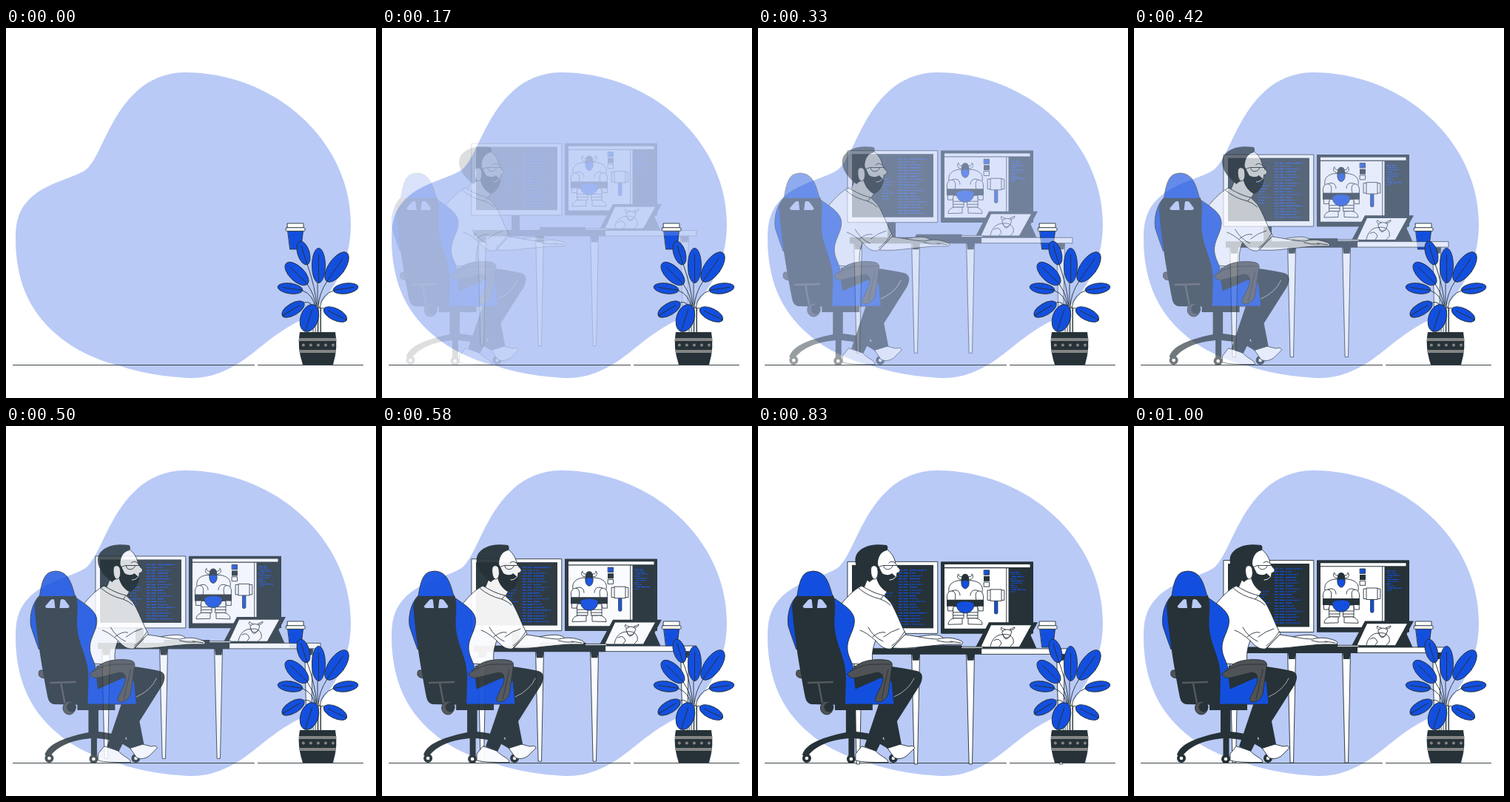
An HTML page for the animation above (1.04 s loop, 500 px wide and 500 px high).

```html
<!DOCTYPE html>
<html lang="en">
<head>
<meta charset="utf-8">
<title>Game artist at work</title>
<style>
html, body { margin: 0; width: 100%; height: 100%; overflow: hidden; background: #fff; }
svg { display: block; width: 100vw; height: 100vh; }
svg * { stroke-linejoin: round; stroke-linecap: round; }
.d { fill: #263238; }
.b { fill: #134fdf; stroke: #263238; stroke-width: .9; }
.w { fill: #fff; stroke: #263238; stroke-width: .9; }
.g { fill: #505355; stroke: #263238; stroke-width: .9; }
.l { fill: none; stroke: #263238; stroke-width: .9; }
.grey { fill: #858585; }
.greyLine { fill: none; stroke: #55595b; stroke-width: 2.4; }
.code { fill: none; stroke: #134fdf; stroke-width: 1.2; }
.code path { stroke-linecap: butt; }
</style>
</head>
<body>
<svg viewBox="0 0 500 500">
  <path fill="#b9caf6" d="M104 194C117 188 126 163 140 136C160 98 188 61 241 60C366 60 466 155 466 265C466 320 440 366 398 395C355 416 333 445 302 460C278 472 262 473 246 473C215 471 180 466 152 456C100 443 58 414 35 375C18 346 13 313 13 285C13 262 17 247 30 233C50 211 86 204 104 194Z"/>
  <path class="l" d="M9.500 455.500H335.500M340.500 455.500H482.500"/>

  <g id="cup">
    <path class="b" d="M381 274.500H401.500L398.500 299H384Z"/>
    <rect class="w" x="380.500" y="264" width="21.500" height="6"/>
    <rect class="w" x="378.300" y="269.800" width="25.700" height="4.600" rx="1"/>
  </g>

  <g id="desk">
    <g id="legs"></g>
    <path class="d" d="M175 278H186V299H175Z"/>
    <rect class="w" x="121.300" y="181.500" width="121.500" height="97"/>
    <rect class="d" x="127" y="186" width="110" height="85.500"/>
    <g class="code" id="editor"></g>

    <rect class="d" x="247" y="181.300" width="125" height="97.500" rx=".8"/>
    <path fill="#fff" d="M252 185.200H367.500V189.200H252ZM252 190.300H338.500V272H252Z"/>
    <path class="l" d="M335.700 190V272" stroke-width=".6"/>
    <g class="code" id="panel"></g>
    <rect class="b" x="305.500" y="193" width="7" height="6.300"/>
    <rect class="d" x="305" y="201" width="8" height="7"/>
    <rect class="w" x="305.500" y="209.300" width="7" height="6"/>
    <rect class="b" x="319.600" y="233" width="4.300" height="19" rx="1.500"/>
    <path class="w" d="M310.500 220H314V219H329V220H332.800V233.500H329V234.500H314V233.500H310.500ZM314 220V233.500M329 220V233.500"/>

    <g id="warrior">
      <path class="w" d="M264 242H278V258H264ZM283 242H297V258H283ZM264 250H278M283 250H297M264 254H278M283 254H297"/>
      <path class="w" d="M257 266C257 260 264 257 269 258H276V265.500ZM303 266C303 260 296 257 291 258H284V265.500Z"/>
      <path class="w" d="M258 222C256 212 264 208 271 207H289C298 208 305 213 303 222L300 236H261Z"/>
      <path class="w" d="M256 234C254 226 257 221 262 221C268 222 267 229 266 234L263 248H257ZM304 234C306 226 303 221 298 221C293 222 294 229 295 234L298 248H304Z"/>
      <path class="l" d="M262 221C268 218 273 221 273 227M298 221C292 218 287 221 287 227"/>
      <path class="d" d="M255 233H305V242H255Z"/>
      <path class="b" d="M268 238C274 234 286 234 292 238C292 246 287 251 280 251C273 251 268 246 268 238Z"/>
      <path class="w" d="M275 206C268 205 269 200 271 198C271 202 274 202 277 202ZM285 206C292 205 291 200 289 198C289 202 286 202 283 202Z"/>
      <path class="d" d="M275 208C274 201 277 198 280 198S286 201 285 208Z"/>
      <path class="b" d="M275 208Q280 205 285 208C286 215 282 218 280 218S274 215 275 208Z"/>
    </g>

    <path class="d" d="M312 263.500H378L368.500 281L376.500 299H293Z"/>
    <path fill="#fff" d="M315 267.300H369L353 296.300H301.500Z"/>
    <path class="l" d="M314 296C316 286 322 280 330 280C339 278 347 283 345 292L341 296M319 288Q326 283 329 292L326 296M331 280Q334 292 341 281M330 276Q336 270 343 276L340 283Q334 287 331 281ZM331 275Q327 274 329 270Q331 273 334 273M341 274Q347 274 347 270Q343 272 340 273"/>
    <path class="w" d="M302 299H425V306.500H302Z"/>
    <path class="d" d="M124 298.500H302V307H124ZM214 294.500H275L277 299H212Z"/>
    <rect class="w" x="275" y="296.300" width="29" height="2"/>
  </g>

  <g id="worker">
    <path class="d" d="M117 384H130.500V413C152 415 171 421 182 435L187 445H181C172 430 152 424 128.500 422V452H120.500V422C100 424 80 429 66 445H58C61 432 78 422 117 414Z"/>
    <g id="wheels"></g>

    <path class="w" d="M138 433L130 443V452Q140 455 174 454.500C174 449 164 447 157 439Z"/>
    <path class="w" d="M173 435L182 448Q190 452 199 446L210 435Q209 431 202 433L190 430Z"/>
    <path class="d" d="M165 365L195 365L158 440L142 433Z"/>
    <path class="d" d="M128 324C165 321 195 327 213 331C221 333 222 340 217 350L186 399L192 430L173 436L162 402L174 366H128Z"/>
    <path d="M209 341Q202 357 182 366" fill="none" stroke="#fff" stroke-width=".6"/>

    <path class="w" d="M212 285C225 283 240 280 247 285L250 289L238 290Z"/>
    <path class="w" d="M148 184L170 165C178 170 183 178 184 186L190 194Q190.500 198 186 198.500L185 206L176 218L168 231L141 219L146 207Z"/>
    <path class="d" d="M149 211C138 203 127 190 130 177C134 163 153 158 172 161C175 165 173 168 171 168.500C165 170 160 176 160 187L166 199C171 202 176 202 179 199L186 205C185 215 177 224 172 224C166 221 160 214 158 205C155 207 151 208 149 211Z"/>
    <path class="w" d="M151 191C153 187 160 188 160 195C161 202 159 207 155 207C151 205 150 197 151 191Z"/>
    <path class="l" d="M160 191L167 188.500H187V191M168 189C168 196 179 195 180 189" stroke-width="1.200"/>
    <path class="l" d="M175 185Q179 181 183 185" stroke-width="1.800"/>
    <path d="M176 208Q181 208 184 204" fill="none" stroke="#fff"/>
    <path class="w" d="M138 216C126 222 116 234 107 245L108 320L154 323C151 311 153 300 157 290C165 299 170 302 178 301L198 281C191 269 185 250 177 238L168 229C155 226 147 221 138 216Z"/>
    <path class="l" d="M134 219Q146 230 164 234L168 229M164 234Q172 237 177 242M147 272Q154 285 167 291M157 290Q145 279 136 276M168 285Q178 277 189 274M153 285Q162 277 170 279M179 297Q189 290 196 278"/>
    <path class="w" d="M197 282C213 284 228 288 241 288C252 285 262 286 272 290Q277 293 273 295L262 295C245 295 235 297 222 298C205 300 195 301 180 300Z"/>
    <path class="l" d="M258 291L272 293M240 290Q250 293 261 292"/>

    <path class="g" d="M58 330H52Q49 331 50 337Q52 341 60 341Z"/>
    <path class="b" d="M51 229C42 238 37 254 39 270Q43 283 50 302L60 280Z"/>
    <path class="b" d="M100 232C113 241 125 248 128 259C131 272 120 284 119 297C118 312 127 318 127 331L130 355L164 340L179 345L182 376H112L100 280Z"/>
    <path class="d" fill-rule="evenodd" d="M52 229H100C105 243 100 258 102 275C105 300 118 315 117 343L116 377L70 376Q64 375 62 367C52 315 47 280 44 243Q46 233 52 229ZM59 243L66 235Q71 232 71 237L72 246H62Q58 246 59 243ZM91 243L85 235Q79 232 79 237L78 246H88Q92 246 91 243Z"/>
    <path class="b" d="M51 230C53 216 56 199 67 197Q73 195 79 197C92 201 95 217 99 230Z"/>
    <path class="d" d="M102 376H153V384H102Z"/>
    <path class="greyLine" d="M66 347L99 346M80 348L85 374"/>
    <ellipse class="g" cx="91" cy="381" rx="8.500" ry="9"/>
    <circle class="d" cx="94" cy="380" r="6.500"/>
    <path class="g" d="M119 335C127 328 132 321 143 318C154 315 166 315 175 317Q181 319 179 326L174 362Q170 373 160 373Q155 372 157 367L166 348Q170 333 159 333L131 340Q121 342 119 335Z"/>
    <path class="l" d="M123 332Q139 321 158 322L177 322M174 329L165 369"/>
  </g>

  <g id="plant"></g>
</svg>
<script>
const LOOP = 1040, FRAME = 1000 / 24, SLIDE = 30;
const byId = id => document.getElementById(id);
const repeat = (n, draw) => Array.from({ length: n }, (_, i) => draw(i)).join('');
const noise = i => Math.abs(Math.sin(i * 12.9898) * 43758.5453) % 1;

byId('legs').innerHTML = [130, 208, 282, 404].map(x =>
  `<path class="w" d="M${x} 306H${x + 10.5}L${x + 7.5} 455H${x + 3.5}Z"/>
   <path class="d" d="M${x} 306H${x + 10.5}L${x + 9.5} 315H${x + 1}Z"/>`).join('');

byId('editor').innerHTML = repeat(20, i => {
  const y = 193 + i * 3.85, length = 8 + 16 * noise(i + 1);
  const indent = i > 6 && i < 15 ? `<path d="M168 ${y}h${8 + 10 * noise(i)}" stroke-dasharray="2 1"/>` : '';
  return `<path d="M190 ${y}h5m1.500 0h${5 + 3 * noise(i + 7)}"/>
    <path d="M205 ${y}h${length}" stroke-dasharray="${i % 3 ? '2 1' : '9 1'}"/>${indent}`;
});

byId('panel').innerHTML = repeat(10, i =>
  `<path d="M${341 + i % 3} ${196 + i * 2.9}h${7 + 14 * noise(i + 4)}" stroke-dasharray="${i % 2 ? '2 1' : '6 1'}"/>`);

byId('wheels').innerHTML = [[64, 449], [124, 450], [181, 449]].map(([x, y]) =>
  `<circle class="d" cx="${x}" cy="${y}" r="6"/><circle cx="${x}" cy="${y}" r="2.300" fill="#fff"/>`).join('');

// Leaves: centre, half width, half length, tilt
const leaves = [
  [402, 304, 8, 16.5, -17], [422.5, 321, 9, 23.5, 0], [447, 323, 11, 23.5, 35],
  [393, 332, 10, 20, -46], [384, 352, 7, 17, -82], [459, 352, 7, 17, 82],
  [388, 380, 8, 17, 59], [445, 387, 8, 17, -64], [410, 392, 12, 19, 18]
];
const leaf = ([x, y, rx, ry, tilt]) =>
  `<g transform="translate(${x} ${y}) rotate(${tilt})"><ellipse class="b" rx="${rx}" ry="${ry}"/>
   <path class="l" d="M0 ${ry}V${-ry * .62}"/></g>`;

byId('plant').innerHTML = `
  <path class="w" d="M422 412V378H425.500V412Z"/>
  <path class="l" d="M415 412V375M418 412V378M421 412V345M425 412V378
    M407 319Q418 350 420 376M434 342Q422 360 422 378M407 346Q417 360 419 377
    M401 355Q415 360 418 378M442 355Q427 360 424 378M403 371Q413 368 415 380M430 379Q426 376 425 382"/>
  ${leaves.map(leaf).join('')}
  <path class="d" d="M397 411H445Q449 431 442 455H401Q393 431 397 411Z"/>
  <path class="grey" d="M396 419H446.300V423H395.700ZM396 435H446L445.500 439H396.700Z"/>
  ${repeat(5, i => `<circle class="grey" cx="${401.800 + i * 10.05}" cy="428.500" r="2"/>`)}`;

const bezier = (s, a, b) => 3 * (1 - s) ** 2 * s * a + 3 * (1 - s) * s * s * b + s ** 3;

// Cubic easing that overshoots before it settles
function ease(x) {
  let low = 0, high = 1;
  for (let i = 0; i < 24; i++) {
    const mid = (low + high) / 2;
    if (bezier(mid, .36, .5) < x) low = mid; else high = mid;
  }
  return bezier(low, -.01, 1.38);
}

const desk = byId('desk'), worker = byId('worker');

// The motion runs at 24 steps a second
function render(time) {
  const step = Math.floor((time % LOOP + 5) / FRAME);
  const progress = ease(Math.min(1, (step + .92) / 24));
  const shift = SLIDE * (progress - 1);
  const opacity = step < 2 ? 0 : Math.min(1, progress);
  desk.setAttribute('transform', `translate(0 ${shift})`);
  worker.setAttribute('transform', `translate(${shift} 0)`);
  desk.setAttribute('opacity', opacity);
  worker.setAttribute('opacity', opacity);
}

const start = performance.now();
function tick() {
  render(performance.now() - start);
  requestAnimationFrame(tick);
}
tick();
</script>
</body>
</html>
```
